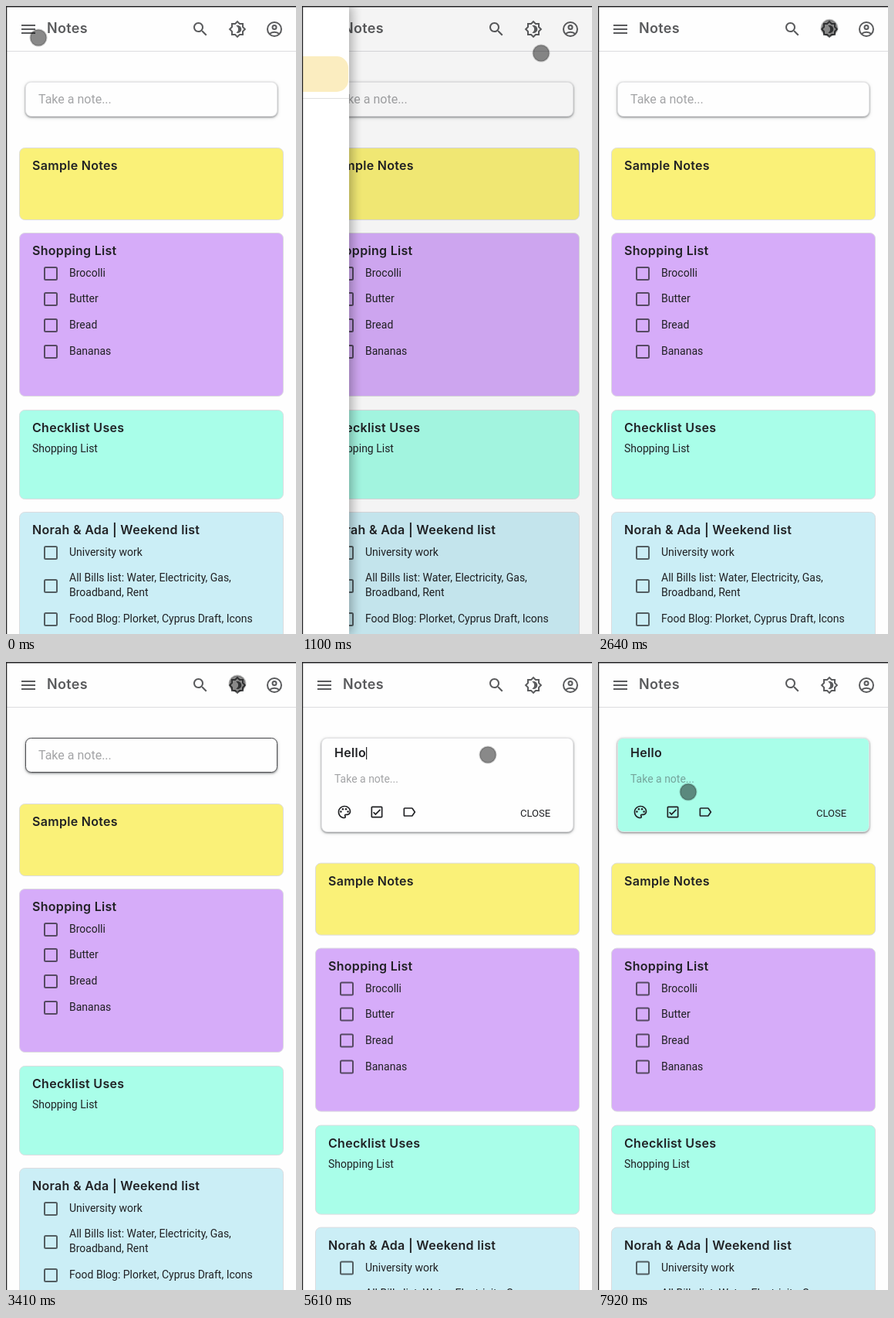
Animation of 376 by 812 pixels, one loop 8 s. Source, as an HTML page:

```html
<!DOCTYPE html>
<html lang="en">
<head>
<meta charset="utf-8">
<title>Notes</title>
<style>
  :root {
    --d: 0%;
    --bg: color-mix(in srgb, #202124 var(--d), #fefefe);
    --ink: color-mix(in srgb, #e8eaed var(--d), #202124);
    --icon: color-mix(in srgb, #e8eaed var(--d), #5a5b5d);
    --line: color-mix(in srgb, #5f6368 var(--d), #dcdcdf);
    --yellow: color-mix(in srgb, #635d19 var(--d), #faf178);
    --purple: color-mix(in srgb, #42275e var(--d), #d6acf9);
    --teal: color-mix(in srgb, #16504b var(--d), #a9fee9);
    --blue: color-mix(in srgb, #2d555e var(--d), #cbeef6);
  }
  html, body { margin: 0; width: 100%; height: 100%; overflow: hidden; background: #fff; }
  svg { display: block; }
  text { font: 14px Roboto, sans-serif; fill: var(--ink); white-space: pre; }
  .title { font: 600 16px Inter, sans-serif; letter-spacing: .3px; }
  .brand { font: 600 18px Inter, sans-serif; letter-spacing: .3px; fill: var(--icon); }
  .hint { fill: #a3a4a6; }
  .card { stroke: var(--line); }
  .box { fill: none; stroke: var(--ink); stroke-width: 2; opacity: .7; }
  #note {
    stroke: #e4e4e6;
    filter: drop-shadow(0 1px 1px rgba(60, 64, 67, .55)) drop-shadow(0 1px 2px rgba(60, 64, 67, .2));
  }
  #drawer { filter: drop-shadow(4px 0 7px rgba(0, 0, 0, .3)); }
  #picker { filter: drop-shadow(0 3px 5px rgba(0, 0, 0, .32)); }
</style>
</head>
<body>
<svg id="stage" width="376" height="812" viewBox="0 0 376 812"></svg>
<script>
const ICONS = {
  menu: '<path d="M3 18h18v-2H3v2zm0-5h18v-2H3v2zm0-7v2h18V6H3z"/>',
  search: '<path d="M15.5 14h-.79l-.28-.27C15.41 12.59 16 11.11 16 9.5 16 5.91 13.09 3 9.5 3S3 5.91 3 9.5 5.91 16 9.5 16c1.61 0 3.09-.59 4.23-1.57l.27.28v.79l5 4.99L20.49 19l-4.99-5zm-6 0C7.01 14 5 11.99 5 9.5S7.01 5 9.5 5 14 7.01 14 9.5 11.99 14 9.5 14z"/>',
  theme: '<path d="M20 8.69V4h-4.69L12 .69 8.69 4H4v4.69L.69 12 4 15.31V20h4.69L12 23.31 15.31 20H20v-4.69L23.31 12 20 8.69zm-2 5.79V18h-3.52L12 20.48 9.52 18H6v-3.52L3.52 12 6 9.52V6h3.52L12 3.52 14.48 6H18v3.52L20.48 12 18 14.48zM12.29 7c-.74 0-1.45.17-2.08.46 1.72.79 2.92 2.53 2.92 4.54s-1.2 3.75-2.92 4.54c.63.29 1.34.46 2.08.46 2.76 0 5-2.24 5-5s-2.24-5-5-5z"/>',
  account: '<g fill="none" stroke="var(--icon)" stroke-width="2"><circle cx="12" cy="12" r="9"/><circle cx="12" cy="9.5" r="2.5"/><path d="M5.8 18.2c3-3.2 9.4-3.2 12.4 0"/></g>',
  palette: '<path d="M12 22C6.49 22 2 17.51 2 12S6.49 2 12 2s10 4.04 10 9c0 3.31-2.69 6-6 6h-1.77c-.28 0-.5.22-.5.5 0 .12.05.23.13.33.41.47.64 1.06.64 1.67A2.5 2.5 0 0 1 12 22zm0-18c-4.41 0-8 3.59-8 8s3.59 8 8 8c.28 0 .5-.22.5-.5a.54.54 0 0 0-.14-.35c-.41-.46-.63-1.05-.63-1.65a2.5 2.5 0 0 1 2.5-2.5H16c2.21 0 4-1.79 4-4 0-3.86-3.59-7-8-7z"/><circle cx="6.5" cy="11.5" r="1.5"/><circle cx="9.5" cy="7.5" r="1.5"/><circle cx="14.5" cy="7.5" r="1.5"/><circle cx="17.5" cy="11.5" r="1.5"/>',
  list: '<path d="M19 3H5c-1.1 0-2 .9-2 2v14c0 1.1.9 2 2 2h14c1.1 0 2-.9 2-2V5c0-1.1-.9-2-2-2zm0 16H5V5h14v14zM17.99 9l-1.41-1.42-6.59 6.59-2.58-2.57-1.42 1.41 4 3.99z"/>',
  label: '<path d="M17.63 5.84C17.27 5.33 16.67 5 16 5L5 5.01C3.9 5.01 3 5.9 3 7v10c0 1.1.9 1.99 2 1.99L16 19c.67 0 1.27-.33 1.63-.84L22 12l-4.37-6.16zM16 17H5V7h11l3.55 5L16 17z"/>'
};

const icon = (name, cx, cy, size = 24, fill = 'var(--icon)') =>
  `<g fill="${fill}" transform="translate(${cx - size / 2} ${cy - size / 2}) scale(${size / 24})">${ICONS[name]}</g>`;
const text = (x, y, s, attrs = '') => `<text x="${x}" y="${y}" ${attrs}>${s}</text>`;
const title = (y, s) => text(34, y, s, 'class="title"');
const card = (color, y, h) =>
  `<rect class="card" x="17.5" y="${y}.5" width="342" height="${h}" rx="7" fill="var(--${color})"/>`;
const item = (cy, ...lines) =>
  `<rect class="box" x="50" y="${cy - 8}" width="16" height="16" rx="1.5"/>` +
  lines.map((s, i) => text(82, cy + 4 - (lines.length - 1) * 10 + i * 19, s)).join('');

const SWATCHES = ['#fff', '#ee8c82', '#f3bd30', '#faf178', '#ccfb90', '#a9fee9',
  '#cbeef6', '#a3c9e2', '#d3abf7', '#dfc6e2', '#e6c9a8', '#e8e8ee'];
const spot = i => [62 + i % 4 * 32, 93 + Math.floor(i / 4) * 32];
const BROWN = 10, TEAL = 5;

document.getElementById('stage').innerHTML = `
  <rect width="376" height="812" fill="var(--bg)"/>
  <path d="M0 58.5H376" stroke="var(--line)"/>
  ${icon('menu', 29, 30)}${text(53, 35, 'Notes', 'class="brand"')}
  ${icon('search', 252, 30)}${icon('theme', 300, 30)}${icon('account', 348, 30)}
  <rect id="note" x="25.5" y="98.5" width="326" rx="7"/>
  <rect id="focus" x="25.5" y="98.5" width="326" height="44" rx="7" fill="none" stroke="#4c4d50"/>
  <text id="hint" class="hint" x="42">Take a note...</text>
  <g id="editor">
    <text id="typed" class="title" x="42" y="123"></text>
    <rect id="caret" y="110" width="1.2" height="16" fill="var(--ink)"/>
    ${icon('palette', 55, 194, 20, 'var(--ink)')}${icon('list', 97, 194, 20, 'var(--ink)')}
    ${icon('label', 139, 194, 20, 'var(--ink)')}
    ${text(283, 200, 'CLOSE', 'style="font-size:13px"')}
  </g>
  <g id="cards">
    ${card('yellow', 183, 93)}${title(212, 'Sample Notes')}
    ${card('purple', 293, 211)}${title(322, 'Shopping List')}
    ${['Brocolli', 'Butter', 'Bread', 'Bananas'].map((s, i) => item(Math.floor(346 + i * 33.7), s)).join('')}
    ${card('teal', 522, 115)}${title(551, 'Checklist Uses')}${text(34, 577, 'Shopping List')}
    ${card('blue', 654, 200)}${title(683, 'Norah &amp; Ada | Weekend list')}
    ${item(707, 'University work')}
    ${item(750, 'All Bills list: Water, Electricity, Gas,', 'Broadband, Rent')}
    ${item(793, 'Food Blog: Plorket, Cyprus Draft, Icons')}
  </g>
  <g id="picker">
    <rect x="42" y="73" width="136" height="108" rx="4" fill="#fff"/>
    ${SWATCHES.map((c, i) => `<circle cx="${spot(i)[0]}" cy="${spot(i)[1]}" r="14" fill="${c}"/>`).join('')}
    <g id="pick" fill="none" stroke="#222" stroke-width="2">
      <circle r="13.2"/><path d="M-8 .5L-3 5.5L8-5.5" stroke="#75685a" stroke-width="2.4"/>
    </g>
  </g>
  <rect id="shade" width="376" height="812"/>
  <g id="drawer">
    <rect width="256" height="812" fill="#fff"/>
    <path d="M0 65H240a15 15 0 0 1 15 15v16a15 15 0 0 1-15 15H0z" fill="#fbedc0"/>
    <path d="M0 119.5H256" stroke="#e0e0e0"/>
    <text x="72" y="93" style="fill:#202124">Notes</text>
  </g>
  <circle id="pointer" r="10.5" fill="rgba(0,0,0,.46)" stroke="rgba(0,0,0,.2)" stroke-width="2"/>
  <path d="M.5 0V812M0 .75H376" stroke="#242426" stroke-width="1.5"/>`;

const $ = Object.fromEntries([...document.querySelectorAll('#stage [id]')].map(e => [e.id, e]));
const LOOP = 8000, STEP = 110, DRAWER = 256;
const clamp = v => Math.min(1, Math.max(0, v));
const ramp = (t, start, length) => clamp((t - start) / length);
const show = (el, on) => { el.style.opacity = +on; };

// Cubic bezier with control points (x1, 0) and (x2, 1).
function bezier(x, x1, x2) {
  let lo = 0, hi = 1;
  for (let i = 0; i < 20; i++) {
    const s = (lo + hi) / 2, r = 1 - s;
    if (3 * r * r * s * x1 + 3 * r * s * s * x2 + s ** 3 < x) lo = s; else hi = s;
  }
  return lo * lo * (3 - 2 * lo);
}

// Time, x, y
const PATH = [
  [0, 42, 41], [330, 40, 40], [880, 312, 66], [1100, 310, 61], [1320, 300, 29], [3410, 300, 28],
  [3630, 270, 78], [3850, 241, 120], [5610, 241, 120], [6270, 62, 190], [6380, 55, 194],
  [6490, 55, 194], [6820, 126, 157], [6930, 107, 138], [7040, 94, 125], [7480, 94, 125], [7920, 117, 168]
];
const KEYS = [4730, 4840, 4950, 5060, 5280];

function pointerAt(t) {
  const i = PATH.findIndex(p => p[0] > t);
  if (i < 0) return PATH.at(-1).slice(1);
  const [a, b] = [PATH[i - 1], PATH[i]];
  const k = bezier((t - a[0]) / (b[0] - a[0]), .35, .65);
  return [a[1] + (b[1] - a[1]) * k, a[2] + (b[2] - a[2]) * k];
}

function render(t) {
  const dark = ramp(t, 2800, 170) - ramp(t, 3240, 160);
  document.documentElement.style.setProperty('--d', dark * 100 + '%');
  show($.focus, t >= 2860 && t < 3520);

  const closing = ramp(t, 970, 195), opening = bezier(ramp(t, 200, 225), .2, .4);
  const out = opening - bezier(closing, .4, .6);
  $.drawer.setAttribute('transform', `translate(${DRAWER * (out - 1)})`);
  show($.drawer, out > 0);
  $.shade.style.opacity = .5 * (opening - bezier(closing, .4, .2));

  const open = bezier(ramp(t, 4050, 170), .4, .2);
  $.note.setAttribute('height', 44 + 77 * open);
  $.cards.setAttribute('transform', `translate(0 ${76.6 * open})`);
  show($.editor, open > .9);
  $.hint.setAttribute('y', 126 + 30 * open);
  $.hint.style.fontSize = 16 - 2 * open + 'px';

  const typed = 'Hello'.slice(0, KEYS.filter(k => k <= t).length);
  if ($.typed.textContent !== typed) $.typed.textContent = typed;
  const lastKey = KEYS.findLast(k => k <= t) ?? 4070;
  $.caret.setAttribute('x', 42 + (typed ? $.typed.getComputedTextLength() : 0));
  show($.caret, t < 6380 && (t - lastKey) % 1060 < 530);

  const tint = ramp(t, 6990, 160) * 100;
  $.note.style.fill = `color-mix(in srgb, var(--teal) ${tint}%, var(--bg))`;
  $.hint.style.fill = `color-mix(in srgb, #75a59b ${tint}%, #a3a4a6)`;
  $.picker.style.opacity = ramp(t, 6400, 90) - ramp(t, 7540, 150);
  show($.pick, t >= 6820);
  $.pick.setAttribute('transform', `translate(${spot(t < 7040 ? BROWN : TEAL)})`);
  $.pointer.setAttribute('transform', `translate(${pointerAt(t)})`);
}

const start = performance.now();
function tick() {
  const t = (performance.now() - start + 4) % LOOP;
  render(Math.floor(t / STEP) * STEP);
  requestAnimationFrame(tick);
}
tick();
</script>
</body>
</html>
```
